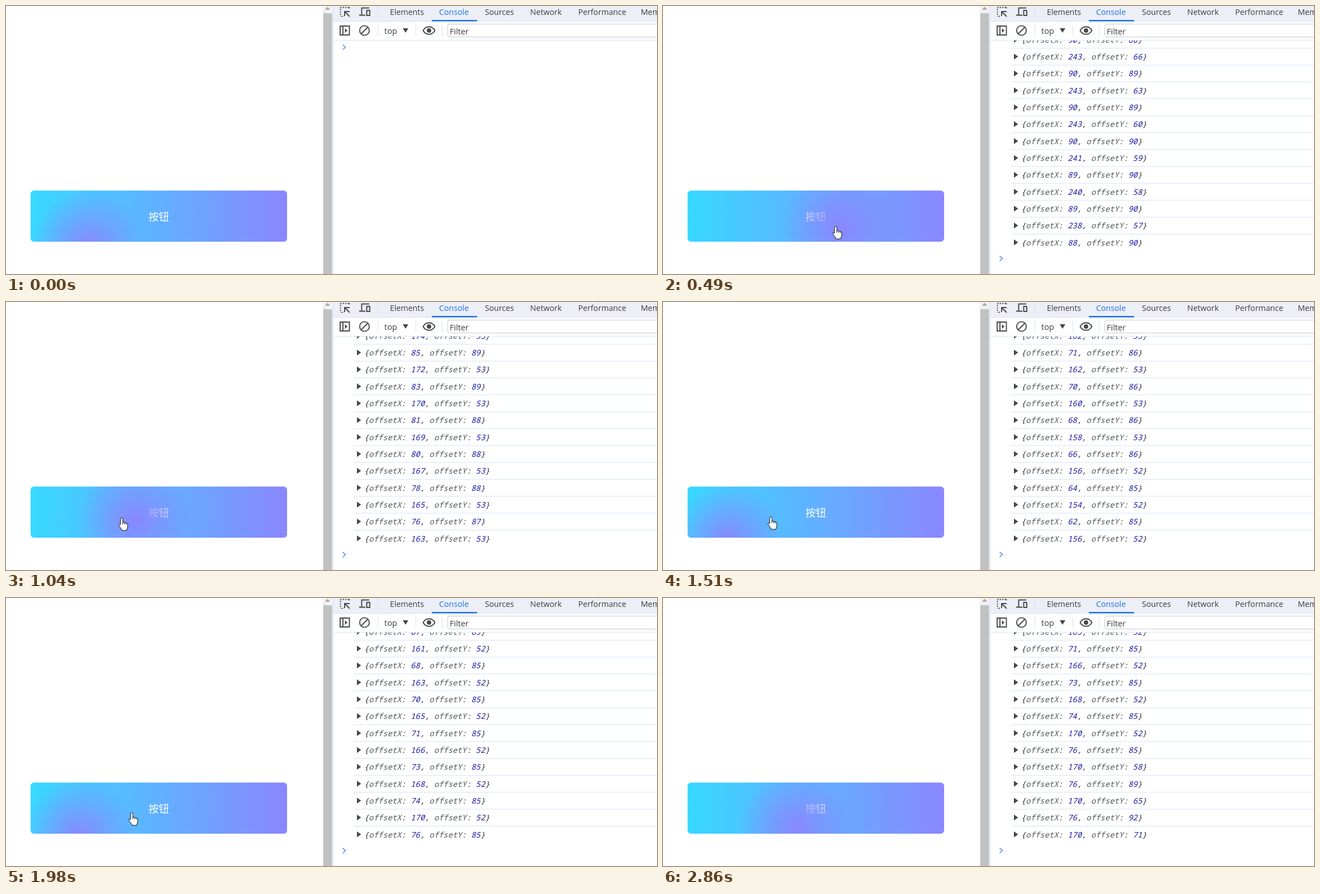
An HTML page for the animation above (4530 ms loop, 1165x481 px).

```html
<!DOCTYPE html>
<html lang="zh">
<head>
<meta charset="utf-8">
<title>Button glow</title>
<style>
html, body { margin: 0; width: 100%; height: 100%; overflow: hidden; background: #fff; }
svg { display: block; }
text { white-space: pre; }
.ui { font: 14.2px "Open Sans", "Noto Sans", sans-serif; fill: #3c3c3c; }
.log { font: italic 13.88px "Noto Sans Mono", "Liberation Mono", monospace; fill: #303030; }
.key { fill: #505357; }
.num { fill: #1a1aa6; }
.label { font: 300 18.4px "Noto Sans CJK SC", "Noto Sans CJK", sans-serif; fill: #fff; }
.icon { fill: none; stroke: #474747; stroke-width: 1.9; }
.line { stroke: #d3e3fd; }
.prompt { fill: none; stroke: #5f92ec; stroke-width: 1.6; }
</style>
</head>
<body>
<svg width="1165" height="481" viewBox="0 0 1165 481">
  <defs>
    <linearGradient id="base">
      <stop stop-color="#38d9ff"/><stop offset="1" stop-color="#8a87ff"/>
    </linearGradient>
    <radialGradient id="halo">
      <stop stop-color="#8a87ff"/><stop offset="1" stop-color="#8a87ff" stop-opacity="0"/>
    </radialGradient>
    <clipPath id="btn"><rect x="44" y="331.3" width="459" height="91.8" rx="6"/></clipPath>
    <clipPath id="pane"><rect x="586" y="61" width="579" height="420"/></clipPath>
  </defs>

  <g clip-path="url(#btn)">
    <rect x="44" y="331" width="459" height="93" fill="url(#base)"/>
    <text class="label" x="273.3" y="384.8" text-anchor="middle">按钮</text>
    <circle id="glow" r="103" fill="url(#halo)"/>
  </g>

  <rect x="566.5" width="19" height="481" fill="#f1f1f1"/>
  <rect x="568" y="13" width="15.5" height="468" fill="#c1c1c1"/>
  <path d="M571 6.5h9l-4.5-5z" fill="#a3a3a3"/>

  <g id="console" clip-path="url(#pane)">
    <path id="prompt" class="prompt" d="M602.5-4.5l5 4.5-5 4.5"/>
  </g>

  <rect x="586" width="579" height="27" fill="#edeff7"/>
  <path class="line" d="M586 27.5h579M586 61.5h579M585.5 0v481M665.5 0v20M665.5 34v20M733.5 34v20M780.5 34v20"/>
  <rect x="762" y="25" width="81" height="2.5" fill="#1a73e8"/>
  <g class="ui" id="tabs"></g>
  <text class="ui" x="677" y="50" style="font-size:14.6px">top</text>
  <path d="M710 40h10l-5 8z" fill="#474747"/>
  <path d="M1170 32.5H794.5q-4 0-4 4v15q0 4 4 4H1170" fill="#fff" stroke="#c5c9d0"/>
  <text class="ui" x="794" y="51" style="font-size:14.5px">Filter</text>

  <g class="icon">
    <path d="M598 2.5h17M598.5 5v14M601 18.5h4M614.5 2v4" stroke-dasharray="2.2 2.2"/>
    <path d="M606 18v-8h9M606.5 10.500l8.500 8.500"/>
    <path d="M650 3.5H636.5V16M632 16.5h11M645.5 8h5.5v9h-5.5z"/>
    <path d="M598 36h16.500v16H598zM603 36v16"/>
    <circle cx="641.5" cy="44" r="8.6"/>
    <path d="M635.5 50l12-12"/>
    <path d="M746.5 44q3.5-6.800 10.500-6.800T767.500 44q-3.500 6.800-10.500 6.800T746.500 44z"/>
    <circle cx="757" cy="44" r="3" fill="#474747"/>
  </g>
  <path d="M606.5 40l4.5 4-4.5 4z" fill="#474747"/>

  <g id="hand" stroke="#111" stroke-width="1" stroke-linejoin="round">
    <path fill="#fff" d="M-2 1.500q0-2 2-2t2 2V7.500q2.200-1 3.200.6 2-.6 3 .8 2.600-.4 2.600 2V15q0 2-1.200 4l-.6 3H.500l-.6-2q-2.500-3-5-7.500-.6-2 1.400-2 1 0 1.700 1.300z"/>
    <path fill="none" d="M2 7v4M5.200 8.200v3M8.200 9v2.500"/>
  </g>
</svg>
<script>
const LOOP = 4530, STEP = 70, SCALE = 1.1475, PITCH = 30.32, SLOTS = 14;
const $ = id => document.getElementById(id);
const place = (el, x, y) => el.setAttribute('transform', `translate(${x} ${y})`);

function add(parent, tag, attrs = {}, text = '') {
  const el = document.createElementNS('http://www.w3.org/2000/svg', tag);
  for (const name in attrs) el.setAttribute(name, attrs[name]);
  el.textContent = text;
  return parent.appendChild(el);
}

// Values at p on a path of poses [position, ...values].
function along(path, p) {
  const i = path.findIndex(pose => pose[0] >= p);
  if (i <= 0) return path.at(i).slice(1);
  const a = path[i - 1], b = path[i], f = (p - a[0]) / (b[0] - a[0]);
  return a.map((v, c) => v + (b[c] - v) * f).slice(1);
}

// Mouse event index: offset in the button x, y, then in the glow x, y.
const offsets = [
  [0, 200, 79, 90, 89], [22, 243, 69, 90, 88], [25, 243, 60, 90, 90], [28, 238, 57, 88, 90],
  [42, 205, 55, 89, 90], [57, 174, 53, 85, 89], [63, 163, 53, 74, 87], [67, 162, 53, 70, 86],
  [71, 154, 52, 62, 85], [80, 170, 52, 76, 85], [83, 170, 71, 76, 96],
];
// Time: rows logged.
const logged = [[0, 0], [70, 5.2], [1040, 127.4], [1180, 144], [1510, 145], [1980, 162], [2650, 163], [2790, 167]];
// Time: fingertip x, y.
const fingertip = [
  [70, 285, 430], [350, 315, 403], [490, 309, 396], [700, 277, 393], [1040, 207, 388],
  [1180, 192, 386], [1510, 193, 386], [1980, 225, 386], [2650, 226, 391], [2860, 226, 500],
];
// Redraws come in bursts; in some the glow trails the log by a row.
const bursts = [
  { from: 0, to: 910, lag: 1 }, { from: 970, to: 1180, lag: 0 }, { from: 1510, to: 1790, lag: 1 },
  { from: 1910, to: 1980, lag: 0 }, { from: 2650, to: 2860, lag: 0 },
];

// Each mouse event logs two rows: button offset, then glow offset.
function entry(row) {
  const v = along(offsets, row >> 1).map(Math.round);
  return row % 2 ? v.slice(2) : v.slice(0, 2);
}

const tabs = { Elements: 687, Console: 775, Sources: 857, Network: 938, Performance: 1024, Memory: 1136 };
for (const name in tabs) {
  const tab = add($('tabs'), 'text', { x: tabs[name], y: 16.3 }, name);
  if (name === 'Console') tab.style.fill = '#1a73e8';
}

const rows = Array.from({ length: SLOTS }, () => {
  const g = add($('console'), 'g');
  add(g, 'path', { class: 'line', d: 'M622-15.200h543' });
  add(g, 'path', { d: 'M628-5.500l7.500 5.300-7.500 5.300z', fill: '#474747' });
  const text = add(g, 'text', { class: 'log', x: 641, y: 5 });
  const span = (s, cls = '') => add(text, 'tspan', { class: cls }, s);
  span('{'); span('offsetX', 'key'); span(': ');
  const x = span('', 'num');
  span(', '); span('offsetY', 'key'); span(': ');
  const y = span('', 'num');
  span('}');
  return { g, x, y };
});

function draw(t, lag) {
  const n = Math.round(along(logged, t)[0]);
  const promptY = Math.min(453.3, 74 + PITCH * n);
  place($('prompt'), 0, promptY);
  rows.forEach(({ g, x, y }, j) => {
    const row = n - 1 - j;
    g.style.display = row < 0 ? 'none' : '';
    if (row < 0) return;
    [x.textContent, y.textContent] = entry(row);
    place(g, 0, promptY - 28.8 - PITCH * j);
  });

  const [gx, gy] = entry(n ? n - 1 - lag : 1);
  place($('glow'), 44 + gx * SCALE, 331.3 + gy * SCALE);

  $('hand').style.display = t ? '' : 'none';
  place($('hand'), ...along(fingertip, t));
}

let shown = -1;
function tick() {
  const now = performance.now() % LOOP;
  const { from, to, lag } = bursts.findLast(b => b.from <= now);
  const t = Math.min(to, from + Math.floor((now - from) / STEP) * STEP);
  if (t !== shown) draw(shown = t, lag);
  requestAnimationFrame(tick);
}
tick();
</script>
</body>
</html>
```
